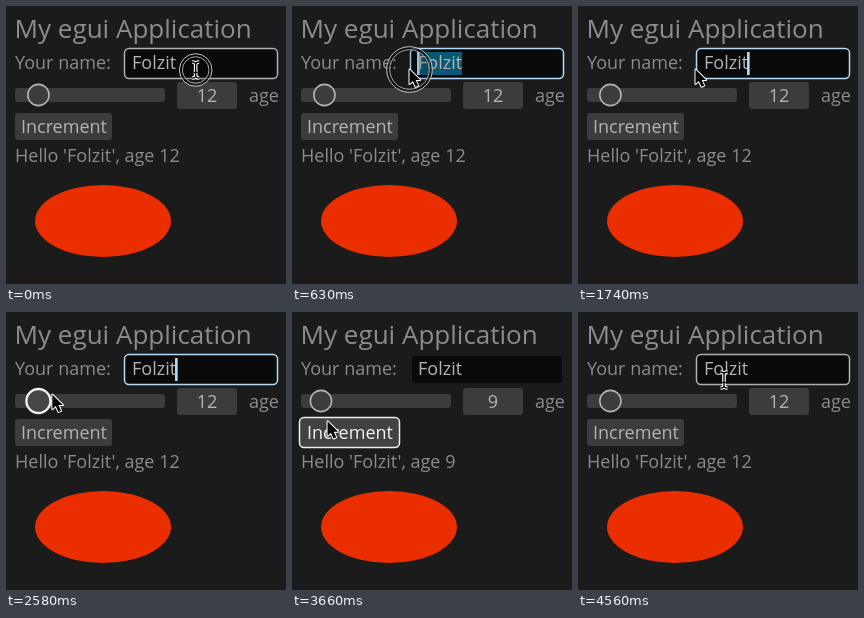
Recreate the animation shown at these times as an HTML page with a canvas. Size 280x278 px, loop 4590 ms.

```html
<!DOCTYPE html>
<html lang="en">
<head>
<meta charset="utf-8">
<title>My egui Application</title>
<style>
  html, body { margin: 0; width: 100%; height: 100%; overflow: hidden; background: #1b1b1b; }
  canvas { display: block; width: 280px; height: 278px; }
</style>
</head>
<body>
<canvas width="280" height="278"></canvas>
<script>
const ctx = document.querySelector('canvas').getContext('2d');
const LOOP = 4590;
const NAME = 'Folzit';
const FONT = '"Open Sans", "Noto Sans", sans-serif';
const BODY = 18, HEADING = 26;
const LABEL = '#8c8c8c', WIDGET = '#3c3c3c', WIDGET_TEXT = '#b4b4b4', ACCENT = '#b4dcfa';

const field = { x: 120, y: 44, w: 150, h: 27 };
const slider = { x: 9, y: 76, w: 150, h: 27 };
const button = { x: 9, y: 107, w: 97, h: 27 };

const typeTimes = [1110, 1260, 1440, 1530, 1650, 1740];
const ages = [[0, 12], [2940, 11], [3060, 10], [3240, 9], [3840, 10], [4500, 12]];
const presses = [
  { down: 0, up: 560, gone: 810 },
  { down: 2820, up: 3140, gone: 3450 },
  { down: 3780, up: 3860, gone: 4080 }
];

const easeOut = p => 1 - (1 - p) ** 2;
const smooth = p => p * p * (3 - 2 * p);
// Pointer moves: start, end, from, to, easing
const moves = [
  [0, 450, [190, 64], [117.5, 63.5], easeOut],
  [2280, 2790, [117.5, 63.5], [32, 86.5], easeOut],
  [2850, 3270, [32, 86.5], [29.8, 88.5], smooth],
  [3450, 3780, [29.8, 88.5], [38, 118], smooth],
  [4130, 4560, [38, 118], [146, 68], smooth]
];

function pointerAt(t) {
  const [start, end, from, to, ease] = moves.filter(m => m[0] <= t).pop();
  const p = ease(Math.min(1, (t - start) / (end - start)));
  return { x: from[0] + (to[0] - from[0]) * p, y: from[1] + (to[1] - from[1]) * p };
}

const inside = (p, r) => p.x >= r.x && p.x <= r.x + r.w && p.y >= r.y && p.y <= r.y + r.h;

function textWidth(string, size = BODY) {
  ctx.font = `${size}px ${FONT}`;
  return ctx.measureText(string).width;
}

function text(string, x, y, color = LABEL, size = BODY) {
  ctx.font = `${size}px ${FONT}`;
  ctx.fillStyle = color;
  ctx.fillText(string, x, y);
}

function box({ x, y, w, h }, fill, stroke, grow = 0) {
  ctx.beginPath();
  ctx.roundRect(x - grow, y - grow, w + 2 * grow, h + 2 * grow, 3 + grow);
  ctx.fillStyle = fill;
  ctx.fill();
  if (stroke) {
    ctx.strokeStyle = stroke;
    ctx.lineWidth = 1.5;
    ctx.stroke();
  }
}

function circle(x, y, r, fill, stroke, width) {
  ctx.beginPath();
  ctx.arc(x, y, r, 0, 2 * Math.PI);
  ctx.fillStyle = fill;
  ctx.fill();
  ctx.strokeStyle = stroke;
  ctx.lineWidth = width;
  ctx.stroke();
}

function drawField(t, name, hover) {
  const focused = t >= 30 && t < 2820;
  box(field, '#0a0a0a', focused ? ACCENT : hover && '#b0b0b0', focused || hover ? 1.5 : 0);
  const left = 126, end = left + textWidth(name);
  let caret = end;
  if (focused && t < typeTimes[0]) {
    const x = pointerAt(t).x;
    for (let i = name.length; i >= 0; i--) {
      const edge = left + textWidth(name.slice(0, i));
      if (edge >= x - 4) caret = edge;
    }
    ctx.fillStyle = '#0b5875';
    ctx.fillRect(caret, 46, end - caret, 23);
  }
  text(name, left, 63, WIDGET_TEXT);
  if (focused) {
    ctx.fillStyle = ACCENT;
    ctx.fillRect(caret - 1, 46, 2.6, 23);
  }
}

function drawSlider(age, hover, active) {
  box({ x: 9, y: 82, w: 150, h: 14 }, WIDGET);
  const x = 18.5 + age * 1.16;
  if (active) circle(x, 89, 12, '#373737', '#fff', 3);
  else if (hover) circle(x, 89, 12, '#464646', '#f0f0f0', 2.4);
  else circle(x, 89, 10.6, WIDGET, WIDGET_TEXT, 1.6);
  box({ x: 171, y: 76, w: 60, h: 27 }, WIDGET);
  ctx.textAlign = 'center';
  text(age, 201, 96, WIDGET_TEXT);
  ctx.textAlign = 'left';
  text('age', 243, 96);
}

function drawRing(t, p) {
  const press = presses.find(q => t >= q.down && t < q.gone);
  if (!press) return;
  const release = Math.min(1, Math.max(0, (t - press.up) / 120));
  const r = 16.3 + 7 * (1 - (1 - release) ** 3);
  circle(p.x, p.y, r - 1.5, 'rgba(0,0,0,.12)', 'rgba(0,0,0,.6)', 3);
  circle(p.x, p.y, r, 'transparent', '#c8c8c8', 1);
  circle(p.x, p.y, r - 3, 'transparent', '#a8a8a8', 1);
}

function drawPointer(p, beam) {
  ctx.save();
  ctx.translate(p.x, p.y);
  ctx.lineJoin = 'round';
  const shape = new Path2D(beam
    ? 'M-3.5-8Q0-8 0-5.5Q0-8 3.5-8M0-5.5V5.5M-3.5 8Q0 8 0 5.5Q0 8 3.5 8M-2 2.5H2'
    : 'M0 0V14.5L3.4 11.4L6 17.3L8.7 16.1L6.1 10.4H10.6Z');
  ctx.strokeStyle = '#fff';
  ctx.lineWidth = beam ? 3.6 : 2;
  ctx.stroke(shape);
  if (beam) {
    ctx.strokeStyle = '#000';
    ctx.lineWidth = 1.3;
    ctx.stroke(shape);
  } else {
    ctx.fillStyle = '#000';
    ctx.fill(shape);
  }
  ctx.restore();
}

function draw(t) {
  const p = pointerAt(t);
  const age = ages.filter(a => a[0] <= t).pop()[1];
  const typed = typeTimes.filter(time => time <= t).length;
  const name = typed ? NAME.slice(0, typed) : NAME;
  const selecting = t < presses[0].up;
  const sliding = t >= presses[1].down && t < 3270;

  ctx.fillStyle = '#1b1b1b';
  ctx.fillRect(0, 0, 280, 278);
  text('My egui Application', 8.5, 32, LABEL, HEADING);
  text('Your name:', 9, 63);
  drawField(t, name, inside(p, field));
  drawSlider(age, inside(p, slider), sliding);

  const hover = inside(p, button);
  box(button, hover ? '#424242' : WIDGET, hover && '#eee', hover ? 1.5 : 0);
  text('Increment', 15, 127, hover ? '#f2f2f2' : WIDGET_TEXT);
  text(`Hello '${name}', age ${age}`, 9, 156);

  ctx.beginPath();
  ctx.ellipse(97, 215, 68, 36, 0, 0, 2 * Math.PI);
  ctx.fillStyle = '#ea2e00';
  ctx.fill();

  drawRing(t, p);
  drawPointer(p, selecting || inside(p, field));
}

const start = performance.now();
function tick() {
  draw((performance.now() - start) % LOOP);
  requestAnimationFrame(tick);
}
tick();
</script>
</body>
</html>
```
